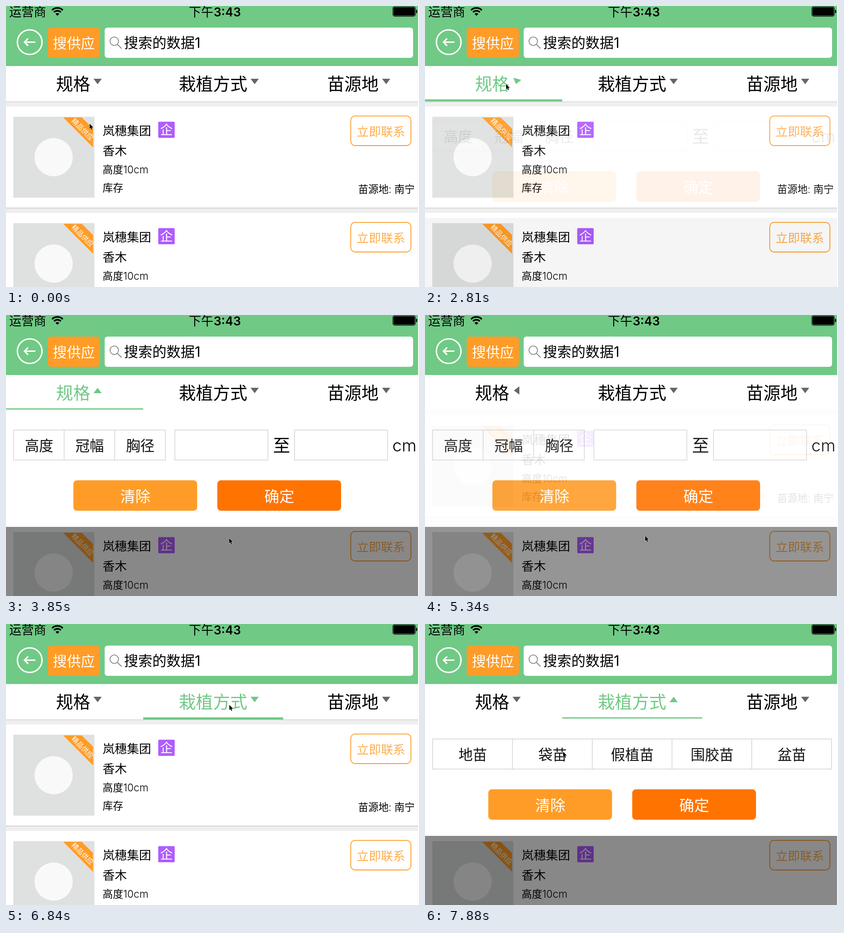
Recreate the animation shown at these times as an HTML page. Size 906x618 px, loop 8000 ms.

```html
<!DOCTYPE html>
<html lang="zh-CN">
<head>
<meta charset="utf-8">
<title>筛选菜单</title>
<style>
  html, body { margin: 0; width: 100%; height: 100%; overflow: hidden; background: #fff; }
  svg { display: block; width: 906px; height: 618px; }
  text { font-family: Inter, "Noto Sans CJK SC", "Noto Sans CJK", sans-serif; white-space: pre; }
</style>
</head>
<body>
<svg id="stage" viewBox="0 0 906 618" xmlns="http://www.w3.org/2000/svg"></svg>
<script>
const LOOP = 8000;
const GREEN = '#70c985', ORANGE = '#ff9c27', DEEP = '#ff7300', GREY = '#666';

// Text is placed by its left edge and the vertical middle of its line.
const text = (s, x, mid, size, fill = '#000', weight = 350, anchor = 'start') =>
  `<text x="${x}" y="${mid + size * 0.38}" font-size="${size}" fill="${fill}" font-weight="${weight}" text-anchor="${anchor}">${s}</text>`;
const centred = (s, x, mid, size, fill, weight) => text(s, x, mid, size, fill, weight, 'middle');
const rect = (x, y, w, h, fill, extra = '') =>
  `<rect x="${x}" y="${y}" width="${w}" height="${h}" fill="${fill}" ${extra}/>`;
const frame = (x, w) => rect(x, 253, w, 66, 'none', 'stroke="#ccc" stroke-width="1.3"');

function header() {
  return rect(0, 0, 904, 132, GREEN) +
    text('运营商', 7, 13, 27) +
    `<g fill="none" stroke="#000" stroke-width="3.4">
       <path d="M101 9.2a16.5 16.5 0 0 1 23.6 0M105.3 13.6a10.5 10.5 0 0 1 15 0"/>
     </g><path d="M108.6 17.2a6 6 0 0 1 8.4 0L112.8 21.6Z"/>` +
    text('下午', 401, 13, 27, '#000', 400) +
    text('3:43', 455.5, 12.8, 26.5, '#000', 600) +
    rect(848.6, 1.6, 49.4, 21, 'none', 'rx="4" stroke="#000" stroke-width="1.2"') +
    rect(850, 3, 46.6, 18.2, '#000', 'rx="2.5"') +
    rect(899.5, 8.5, 2.5, 7, '#000', 'rx="1"') +
    `<g fill="none" stroke="#fff" stroke-width="3.2">
       <circle cx="52" cy="79.5" r="27"/>
       <path d="M41 79.5H64.5M48.5 71.5L40.5 79.5L48.5 87.5"/>
     </g>` +
    rect(91.5, 47.5, 114.5, 66.5, ORANGE, 'rx="7"') +
    text('搜供应', 102.8, 81, 30.7, '#fff') +
    rect(216.5, 47.5, 676.5, 66.5, '#fff', 'rx="6"') +
    `<g fill="none" stroke="#858585" stroke-width="1.8">
       <circle cx="237.5" cy="77.5" r="9.3"/><path d="M244 84L253.5 93.5"/>
     </g>` +
    text('搜索的数据1', 259, 80.5, 31, '#000', 400);
}

const TABS = [
  { label: '规格', x: 109.8, arrow: 201, from: 0, to: 301 },
  { label: '栽植方式', x: 379, arrow: 545.5, from: 301, to: 608 },
  { label: '苗源地', x: 704.7, arrow: 834, from: 608, to: 904 }
];

const tab = (t, i) => `<g id="tab${i}">${text(t.label, t.x, 171, 37.6, 'inherit')}
  <path class="arrow" d="M-9 -6H9L0 6Z" fill="${GREY}"/>
  <path class="line" d="M${t.from} 207.7H${t.to}" stroke="${GREEN}" stroke-width="4.8"/></g>`;

function card(y) {
  return `<g transform="translate(0 ${y})">` +
    rect(0, -11, 904, 11, '#efefef') +
    rect(0, -11.5, 904, 1.8, '#cdcdcd') +
    rect(16, 22.5, 178, 178, '#dfe1e0') +
    '<circle cx="104.5" cy="111.5" r="42" fill="#f8f9f8"/>' +
    `<path d="M125.5 24H166L191 48.5V90Z" fill="${ORANGE}"/>` +
    `<g transform="translate(168 50) rotate(45)">${centred('精品供应', 0, 0, 15.2, '#fff')}</g>` +
    text('岚穗集团', 212, 53, 26.6) +
    rect(334, 33.5, 36, 35.5, '#b05cff', 'rx="2"') +
    centred('企', 352, 51.5, 28, '#fff') +
    text('香木', 212, 96.8, 26.6) +
    text('高度10cm', 212, 138, 22.6) +
    text('库存', 212, 178, 22.6) +
    rect(756.3, 20.8, 132, 65.2, 'none', `rx="9.5" stroke="${ORANGE}" stroke-width="1.8"`) +
    centred('立即联系', 822.5, 54.5, 26.6, '#ffad4d', 300) +
    text('苗源地: 南宁', 896.5, 181.3, 22.3, '#000', 350, 'end') + '</g>';
}

function options(labels, x, w) {
  const step = w / labels.length;
  return frame(x, w) + labels.map((s, i) => {
    const left = x + i * step;
    return (i ? `<path d="M${left} 253V319" stroke="#ccc" stroke-width="1.3"/>` : '') +
      centred(s, left + step / 2 + 0.5, 287, 31.3, '#111');
  }).join('');
}

const button = (s, x, fill) =>
  rect(x, 363.5, 271.5, 67, fill, 'rx="8"') + centred(s, x + 136, 398, 33, '#fff');

const panel = (i, body, x) => `<g id="panel${i}">${rect(0, 208, 904, 258, '#fff')}${body}
  ${button('清除', x, ORANGE)}${button('确定', x + 315.8, DEEP)}</g>`;

const stage = document.getElementById('stage');
stage.innerHTML =
  card(221) + card(455) + rect(0, 132, 904, 78, '#fff') +
  TABS.map(tab).join('') +
  panel(0, options(['高度', '冠幅', '胸径'], 16.5, 333) + frame(370.5, 204) +
    centred('至', 604.5, 286, 37.6) + frame(633, 204) + text('cm', 847.5, 286, 37), 147.8) +
  panel(1, options(['地苗', '袋苗', '假植苗', '围胶苗', '盆苗'], 16.8, 875), 138.8) +
  rect(0, 466, 904, 152, '#000', 'id="dim"') + header() +
  `<path id="cursor" d="M0 0V11.3L2.6 9L4.3 13L6.2 12.2L4.5 8.3H8Z"
     stroke="#fff" stroke-width="1" paint-order="stroke"/>`;

const FADE = 300, FLIP_BACK = 130, BEAT = 148;

const MENUS = [
  { tab: 0, open: 2754, close: 5275 },
  { tab: 1, open: 6832, close: Infinity }
];

// The screen refreshes in beats during these spans and rests between them.
const BURSTS = [
  [1050, 1050], [1490, 2370], [2810, 3850], [4000, 4150],
  [4450, 4600], [5340, 6090], [6840, 7140], [7440, 7880]
];

const HOME = { x: 183.5, y: 259 };
const MOVES = [
  { from: 900, to: 1050, x: 185, y: 258.5 },
  { from: 1400, to: 2370, x: 178, y: 172, bend: 19 },
  { from: 3110, to: 3850, x: 489.5, y: 491 },
  { from: 3850, to: 4600, x: 484, y: 490 },
  { from: 5190, to: 5340, x: 483, y: 486 },
  { from: 5490, to: 6090, x: 490, y: 178 },
  { from: 7290, to: 7880, x: 303, y: 281 }
];

const ease = u => (1 - Math.cos(Math.PI * Math.min(1, Math.max(0, u)))) / 2;

function snap(t) {
  const burst = BURSTS.findLast(b => b[0] <= t);
  if (!burst) return 0;
  const [a, b] = burst;
  if (t >= b) return b;
  const beats = Math.round((b - a) / BEAT);
  return a + Math.floor((t - a) / (b - a) * beats) / beats * (b - a);
}

function pointer(t) {
  let { x, y } = HOME;
  for (const m of MOVES) {
    const u = ease((t - m.from) / (m.to - m.from));
    x += (m.x - x) * u + (m.bend || 0) * 4 * u * (1 - u);
    y += (m.y - y) * u;
  }
  return { x, y };
}

function menu(t) {
  const m = MENUS.findLast(m => m.open <= t);
  if (!m) return { tab: -1, alpha: 0, turn: 0, lit: false };
  const lit = t < m.close;
  const shown = ease((t - m.open) / FADE);
  return {
    tab: m.tab, lit,
    alpha: lit ? shown : 1 - ease((t - m.close) / FADE),
    turn: lit ? shown : 1 - ease((t - m.close) / FLIP_BACK)
  };
}

const find = s => stage.querySelector(s);
const parts = TABS.map((t, i) => ({
  group: find(`#tab${i}`), arrow: find(`#tab${i} .arrow`),
  line: find(`#tab${i} .line`), panel: find(`#panel${i}`)
}));
const dim = find('#dim'), cursor = find('#cursor');

function draw(t) {
  const now = snap(t), m = menu(now), p = pointer(now);
  parts.forEach(({ group, arrow, line, panel }, i) => {
    const on = i === m.tab, green = on && m.lit;
    group.firstElementChild.setAttribute('fill', green ? GREEN : '#000');
    arrow.setAttribute('fill', green ? GREEN : GREY);
    arrow.setAttribute('transform', `translate(${TABS[i].arrow} 166) rotate(${on ? m.turn * 180 : 0})`);
    line.setAttribute('visibility', green ? 'visible' : 'hidden');
    panel?.setAttribute('opacity', on ? m.alpha : 0);
  });
  dim.setAttribute('opacity', m.alpha * 0.467);
  cursor.setAttribute('transform', `translate(${p.x} ${p.y})`);
}

const start = performance.now();
function tick() {
  draw((performance.now() - start) % LOOP);
  requestAnimationFrame(tick);
}
tick();
</script>
</body>
</html>
```
